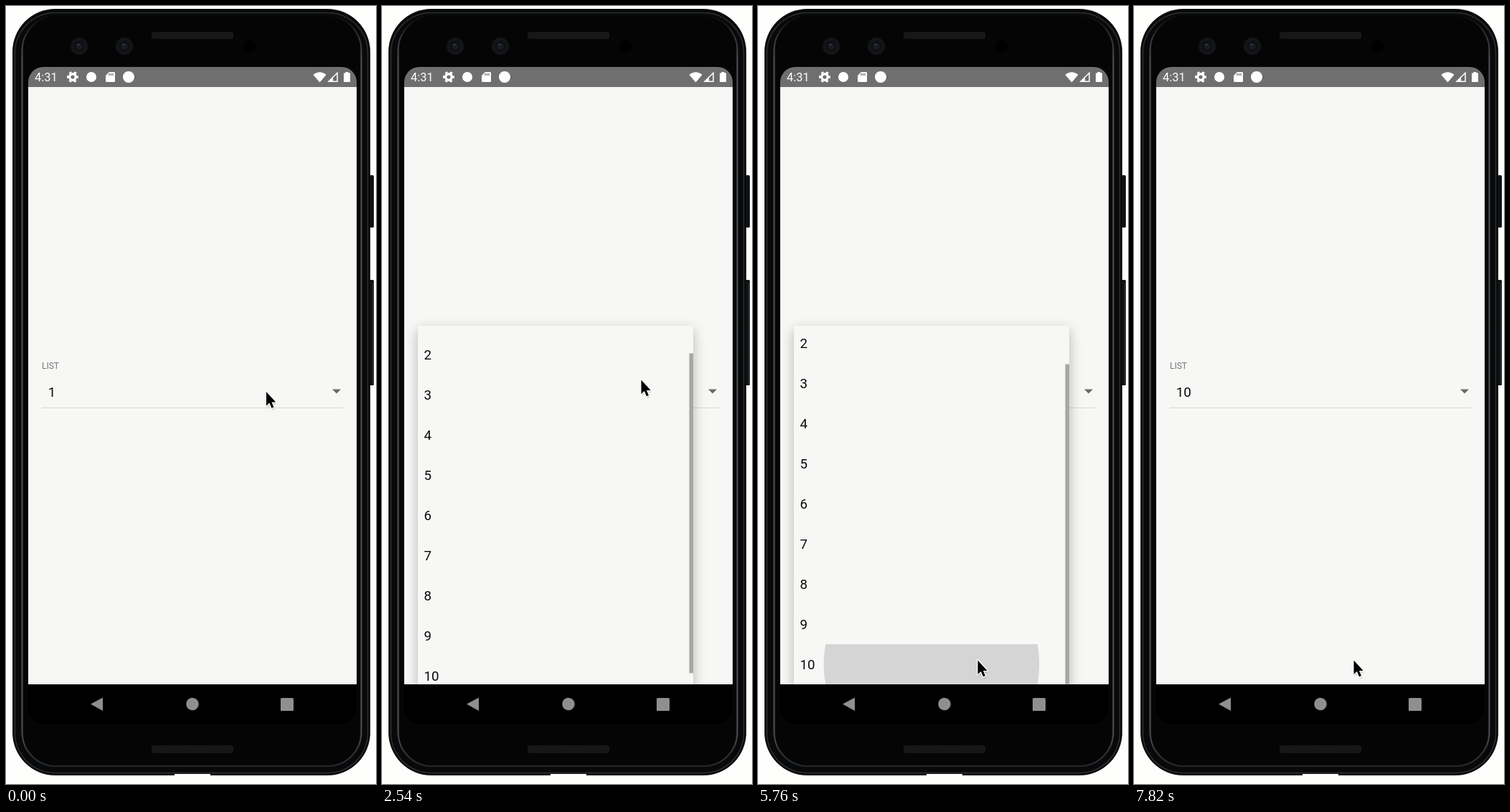
Animation of 516x1085 px, one loop 7.92 s. Source, as an HTML page:

```html
<!DOCTYPE html>
<html lang="en">
<head>
<meta charset="utf-8">
<title>Dropdown list</title>
<style>
html, body { margin: 0; width: 100%; height: 100%; overflow: hidden; background: #fefefc; }
svg { display: block; width: 516px; height: 1085px; }
text { font: 18.7px Roboto, sans-serif; fill: #0a0a0a; }
</style>
</head>
<body>
<svg viewBox="0 0 516 1085">
  <defs>
    <clipPath id="screen"><rect x="31" y="85" width="458" height="916" rx="21"/></clipPath>
    <clipPath id="content"><rect x="31" y="113" width="458" height="833"/></clipPath>
    <clipPath id="panelClip"><rect id="reveal" x="50" y="446" width="384" height="500"/></clipPath>
    <clipPath id="rowClip"><rect x="50" y="890" width="384" height="56"/></clipPath>
    <filter id="blur" x="-20%" y="-20%" width="140%" height="140%"><feGaussianBlur stdDeviation="9"/></filter>
    <filter id="soft" x="-50%" y="-50%" width="200%" height="200%"><feGaussianBlur stdDeviation="1.2"/></filter>
    <linearGradient id="rim" x2="0" y2="1">
      <stop offset="0" stop-color="#17181a"/><stop offset=".06" stop-color="#505155"/>
      <stop offset=".95" stop-color="#505155"/><stop offset="1" stop-color="#26272a"/>
    </linearGradient>
    <pattern id="mesh" width="4" height="4" patternUnits="userSpaceOnUse">
      <rect width="4" height="4" fill="#1d1d1d"/><rect width="2" height="2" fill="#111"/><rect x="2" y="2" width="2" height="2" fill="#111"/>
    </pattern>
    <g id="lens">
      <circle r="12" fill="#131518"/><circle r="7.5" fill="#0d0f12"/>
      <circle r="4.5" fill="#181b20"/><circle cx="-1" cy="-2" r="1.3" fill="#3a4046"/>
    </g>
    <path id="arrow" d="M0 0V19.500L4.400 15.600 7.400 22.800 10.500 21.500 7.500 14.400H13.300Z"/>
  </defs>

  <!-- phone body -->
  <g fill="#111214">
    <rect x="504" y="236" width="9" height="73" rx="1.5"/>
    <rect x="504" y="382" width="9" height="147" rx="1.5"/>
    <path d="M511.5 386V526" stroke="#38393c"/>
    <rect x="9" y="4" width="499" height="1069" rx="60" fill="#08090a"/>
  </g>
  <g fill="none">
    <rect x="12.5" y="9.5" width="492" height="1060" rx="56" stroke="#2c2d2f" stroke-width="1.5"/>
    <rect x="22.5" y="15" width="473" height="1045" rx="47" stroke="url(#rim)" stroke-width="2"/>
  </g>
  <rect x="25" y="14" width="468" height="1045" rx="45" fill="#050505"/>
  <rect x="235" y="1071" width="50" height="3" fill="#fefefc"/>
  <rect x="203" y="36" width="114" height="10" rx="3" fill="url(#mesh)"/>
  <rect x="203" y="1031" width="114" height="11" rx="3" fill="url(#mesh)"/>
  <use href="#lens" x="102" y="56"/>
  <use href="#lens" x="165" y="56"/>
  <circle cx="340" cy="56" r="9"/>

  <g clip-path="url(#screen)">
    <rect x="31" y="113" width="458" height="833" fill="#f7f7f6"/>
    <rect x="31" y="85" width="458" height="28" fill="#6f6f6f"/>
    <rect x="31" y="946" width="458" height="55"/>

    <!-- status bar -->
    <g fill="#fff">
      <text x="40" y="105" style="font-size:16.4px;fill:#fff">4:31</text>
      <circle cx="93" cy="99" r="4.3" fill="none" stroke="#fff" stroke-width="3.4"/>
      <circle cx="93" cy="99" r="6.8" fill="none" stroke="#fff" stroke-width="2.4" stroke-dasharray="3.6 3.52" stroke-dashoffset="1.8"/>
      <circle cx="119" cy="99" r="7"/>
      <path d="M144 92H150.5Q152 92 152 93.5V104.5Q152 106 150.5 106H140.5Q139 106 139 104.5V97Z"/>
      <path d="M144 94V97M146.5 94V97M149 94V97" stroke="#6f6f6f" stroke-width="1.3"/>
      <circle cx="171" cy="99" r="8"/>
      <path d="M428.5 96Q437.5 88.500 446.5 96L437.5 106.5Z"/>
      <path d="M450 105.3H462V93.3Z" fill="none" stroke="#fff" stroke-width="1.5"/>
      <path d="M449 106L456 99V106Z"/>
      <path d="M473.5 92H477.5V93.5H480V106H471V93.5H473.5Z"/>
    </g>

    <!-- navigation bar -->
    <g fill="#8f8f8f">
      <path d="M118 973.5L135 964.5V983Z"/>
      <circle cx="260" cy="973.5" r="8.7"/>
      <rect x="383" y="965" width="18" height="18" rx="1.5"/>
    </g>

    <g clip-path="url(#content)">
      <circle id="tap" cx="461" cy="537" r="23.5" fill="#dcdcdb"/>
      <text x="50" y="506" style="font-size:12px;fill:#747474">LIST</text>
      <text id="value" x="58.8" y="544.7">1</text>
      <path d="M50 560.5H470" stroke="#d5d8c2"/>
      <path d="M455 534.5H467L461 540.5Z" fill="#6a6a6a"/>

      <rect id="shadow" x="50" y="452" width="384" height="510" filter="url(#blur)"/>
      <g id="panel" clip-path="url(#panelClip)">
        <rect x="50" y="446" width="384" height="500" fill="#f7f7f6"/>
        <g clip-path="url(#rowClip)"><circle id="ripple" cy="918" fill="#d5d5d5"/></g>
        <g id="items"></g>
        <rect id="thumb" x="428.5" width="5.5" height="446" fill="#a7a7a5"/>
      </g>
    </g>
  </g>

  <g id="cursor">
    <use href="#arrow" x="1" y="2" opacity=".35" filter="url(#soft)"/>
    <use href="#arrow" stroke="#fff" stroke-width="2.6" stroke-linejoin="round"/>
    <use href="#arrow"/>
  </g>
</svg>
<script>
const LOOP = 7920, ROW = 56, TOP = 446, VIEW = 500, COUNT = 10;
const el = id => document.getElementById(id);
const set = (id, attrs) => { for (const k in attrs) el(id).setAttribute(k, attrs[k]); };
const ramp = (t, a, b) => Math.min(1, Math.max(0, (t - a) / (b - a)));
const smooth = p => p * p * (3 - 2 * p);
const mix = (a, b, p) => a + (b - a) * p;

// Eased position along [time, x, y] stops
function along(stops, t) {
  let i = 0;
  while (i < stops.length - 2 && t > stops[i + 1][0]) i++;
  const [a, b] = [stops[i], stops[i + 1]];
  const p = smooth(ramp(t, a[0], b[0]));
  return a.slice(1).map((v, n) => mix(v, b[n + 1], p));
}

const pointer = [
  [0, 363, 538], [2300, 363, 538], [2540, 361.5, 521.5], [2760, 361, 512],
  [3400, 361, 512], [4300, 309.5, 879.5], [4700, 309.5, 879.5], [5200, 306.5, 912.5], [LOOP, 306.5, 912.5]
];

for (let i = 1; i <= COUNT; i++) {
  el('items').insertAdjacentHTML('beforeend',
    `<text x="58.5" y="${TOP + ROW * i - 21.5}">${i}</text>`);
}

function draw(t) {
  const scroll = 60 * smooth(ramp(t, 2380, 2628));
  const [x, y] = along(pointer, t);
  const open = 1 - (1 - ramp(t, 920, 1120)) ** 2;
  const shown = ramp(t, 900, 1020) * (1 - ramp(t, 6240, 6400));
  const top = mix(510, TOP, open), bottom = mix(566, TOP + VIEW, open);

  el('value').textContent = t < 6200 ? 1 : COUNT;
  set('cursor', { transform: `translate(${x} ${y})` });
  set('tap', { opacity: ramp(t, 820, 900) * (1 - ramp(t, 1140, 1400)) });
  set('reveal', { y: top, height: bottom - top });
  set('shadow', { opacity: 0.27 * shown, y: top + 6, height: bottom - top + 10 });
  set('panel', { opacity: shown, transform: `translate(${mix(50, 0, open)} 0)` });
  set('items', { transform: `translate(0 ${-scroll})` });

  const press = ramp(t, 5620, 5815);
  set('ripple', { r: 208 * press, cx: mix(306, 242, ramp(t, 5620, 5740)) });

  const bar = t < 2300 ? 1 - ramp(t, 1500, 1750)
    : t < 5000 ? ramp(t, 2340, 2400) * (1 - ramp(t, 3100, 3350))
    : ramp(t, 5560, 5620);
  set('thumb', { y: TOP + scroll * VIEW / (ROW * COUNT), opacity: bar });
}

const start = performance.now();
function tick(now) {
  draw(Math.max(0, now - start) % LOOP);
  requestAnimationFrame(tick);
}
draw(0);
requestAnimationFrame(tick);
</script>
</body>
</html>
```
